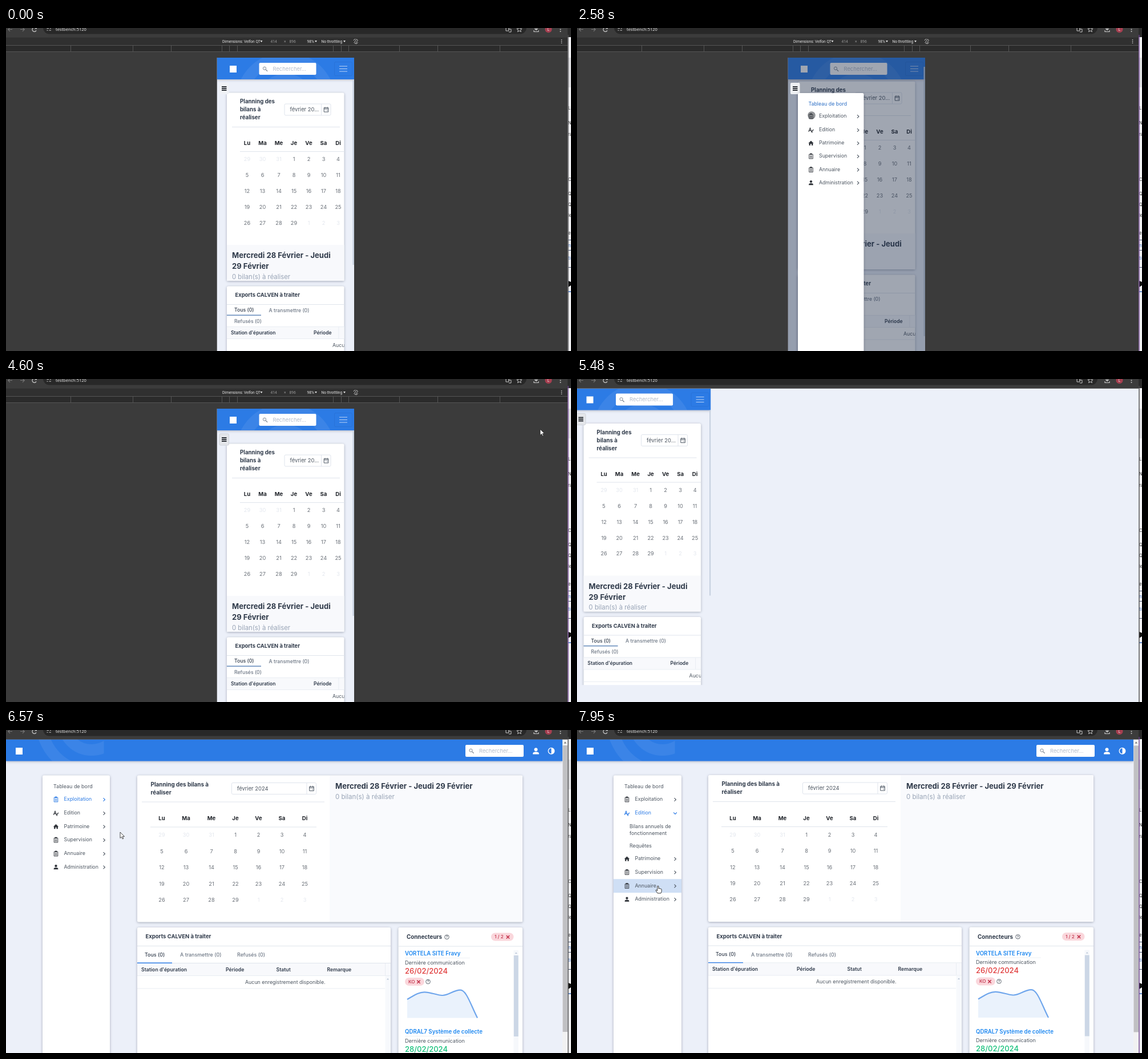
Write an HTML page that moves like this. It is 990x566 px and loops after 8000 ms.

```html
<!DOCTYPE html>
<html lang="fr">
<head>
<meta charset="utf-8">
<title>Tableau de bord</title>
<style>
  html, body { margin: 0; width: 100%; height: 100%; overflow: hidden; background: #3b3b3b; }
  svg { display: block; width: 100vw; height: 100vh; font-family: Inter, "Open Sans", sans-serif; }
  .card { fill: #fff; filter: drop-shadow(0 1.2px 2px rgba(55, 62, 85, .4)); }
  .bar { filter: drop-shadow(0 1.5px 2px rgba(65, 69, 88, .35)); }
  .ui { font-family: Roboto, sans-serif; }
</style>
</head>
<body>
<svg id="stage" viewBox="0 0 990 566" xmlns="http://www.w3.org/2000/svg"></svg>
<script>
const LOOP = 8000;
const BLUE = '#2c7be5', INK = '#2f3a4a', BODY = '#4d5661', MUTED = '#98a4b6', LINE = '#dfe4ec', PAGE = '#ecf0f9';

// Markup helpers; text is placed by its vertical centre.
const text = (x, y, s, size, fill = BODY, weight = 400, anchor = 'start', extra = '') =>
  `<text x="${x}" y="${(y + size * .36).toFixed(2)}" font-size="${size}" fill="${fill}" font-weight="${weight}" text-anchor="${anchor}" ${extra}>${s}</text>`;
const rect = (x, y, w, h, fill, extra = '') =>
  `<rect x="${x}" y="${y}" width="${w}" height="${h}" fill="${fill}" ${extra}/>`;
const path = (d, stroke, width = 1, extra = 'fill="none"') =>
  `<path d="${d}" stroke="${stroke}" stroke-width="${width}" ${extra}/>`;
const card = (x, y, w, h) => `<rect class="card" x="${x}" y="${y}" width="${w}" height="${h}" rx="2.5"/>`;
const clip = (id, x, y, w, h) => `<clipPath id="${id}">${rect(x, y, w, h, '#000')}</clipPath>`;
const group = (id, body, extra = '') => `<g id="${id}" ${extra}>${body}</g>`;
const at = (x, y, body) => `<g transform="translate(${x} ${y})">${body}</g>`;

const icons = {
  list: path('M-3.3-3.300h6.600v7.600h-6.600z', 'currentColor', .9) + `<path d="M-2-5h4v2.400h-4z" fill="currentColor"/>` +
    path('M-2-.9h4M-2 .8h4M-2 2.500h4', 'currentColor', .8),
  edit: path('M-4.2 3L-1.5-3.4L1 3M-3.3 1H0', 'currentColor', 1.2) + path('M.8 3.6L4.3-.8M1 4.2h1.6', 'currentColor', 1.4),
  home: `<path d="M0-4.2L4.6 .2H3.400V4H1V1.4H-1V4H-3.400V.2H-4.600z" fill="currentColor"/>`,
  user: `<circle cy="-2" r="2.1" fill="currentColor"/><path d="M-3.8 4V3Q-3.8 .9 0 .9T3.8 3V4z" fill="currentColor"/>`
};
const menu = [['list', 'Exploitation'], ['edit', 'Edition'], ['home', 'Patrimoine'],
  ['list', 'Supervision'], ['list', 'Annuaire'], ['user', 'Administration']];

const menuRow = (i, x, y, textX, chevX, size) =>
  `<g color="#30343a">${at(x, y + .7, icons[menu[i][0]])}</g>` + text(textX, y, menu[i][1], size, 'currentColor') +
  at(chevX, y + 1, `<path class="chev" d="M-1.5-2.8L1.4 0L-1.5 2.8" fill="none" stroke="currentColor" stroke-width="1.1"/>`);

const search = (x, y, w, h) => rect(x, y, w, h, '#fff', 'rx="2"') +
  `<circle cx="${x + 9.5}" cy="${y + h / 2 - .8}" r="2.6" fill="none" stroke="#7d8794" stroke-width="1"/>` +
  path(`M${x + 11.4} ${y + h / 2 + 1.1}l3.2 3.2`, '#7d8794', 1.3) + text(x + 24, y + h / 2, 'Rechercher...', 9.4, '#b3bccb');

const waves = (x, y, r, id) => `<g clip-path="url(#${id})" fill="none" stroke="#fff" stroke-opacity=".07" stroke-width="20">` +
  `<circle cx="${x}" cy="${y}" r="${r}"/><circle cx="${x}" cy="${y}" r="${r - 38}"/></g>`;

const dateBox = (x, y, w, label) => rect(x, y, w, 20, '#fff', `stroke="${LINE}" rx="2"`) +
  path(`M${x + w - 16.5} ${y}v20`, LINE) + text(x + 9.5, y + 10, label, 9.4) +
  at(x + w - 8, y + 10, path('M-3.8-3.3h7.6v7.4h-7.6zM-3.8-1.2h7.6M-2-4.6v2M2-4.6v2M1 1.8h1.4', '#4f5965', 1));

function calendar(xs, headY, firstY, step) {
  let out = ['Lu', 'Ma', 'Me', 'Je', 'Ve', 'Sa', 'Di'].map((d, i) => text(xs[i], headY, d, 9.6, '#20242a', 700, 'middle')).join('');
  for (let k = 0; k < 35; k++) {
    const day = k - 2, inside = day > 0 && day < 30;
    out += text(xs[k % 7], firstY + step * Math.floor(k / 7), inside ? day : day < 1 ? day + 31 : day - 29,
      9.2, inside ? '#6a7078' : '#e3e7ee', 400, 'middle');
  }
  return out;
}

const help = (x, y) => `<circle cx="${x}" cy="${y}" r="3.8" fill="none" stroke="#4d5661" stroke-width=".9"/>` +
  text(x, y, '?', 6.3, BODY, 600, 'middle');
const pill = (x, y, w, label, fill, ink, mark) => rect(x, y, w, 14, fill, 'rx="7"') +
  text(x + 6, y + 7, label, 8.2, ink, 500) + at(x + w - 10, y + 7.3, path(mark, ink, 1.5));
const CROSS = 'M-2.7-2.7L2.7 2.7M2.7-2.7L-2.7 2.7', TICK = 'M-3.5 0L-1 2.6L3.7-2.6';

// Browser window and the strip of the window behind it
function browser() {
  const g = '#c9c9c9';
  return rect(0, 0, 985, 16.5, '#3c3c3c') + rect(65, -12, 847, 22.5, '#282828', 'rx="11"') +
    path('M11 2.5H4M7-.8L3.7 2.5L7 5.8M25 2.5h7M29-.8l3.3 3.3L29 5.8', '#777', 1.1) +
    path('M53 1A3.7 3.7 0 1 0 53 4.4M53.4-2v3h-3', g, 1.2) +
    path('M71.5.5h3.5M76.8.5h2M71.5 4h2M75.5 4h3.5', g, 1.2) +
    text(87, 2.2, 'testbench:5120', 7.5, '#eee', 400, 'start', 'style="font-family:\'Open Sans\',sans-serif"') +
    path('M876-1h5v6h-5zM880 2h5v5h-4', g, 1) +
    path('M899.5-2l1.3 3 3.3.3-2.5 2.2.8 3.2-2.9-1.8-2.9 1.8.8-3.2-2.5-2.2 3.3-.3z', g, 1) +
    path('M929-3v6M926.3 1l2.7 2.7L931.7 1M925 4v2.5h8V4', g, 1.2) +
    `<circle cx="950.5" cy="2.3" r="6" fill="#a53f50"/>` + text(950.5, 2.2, 'L', 7, '#f5dfe3', 400, 'middle') +
    `<g fill="${g}"><circle cx="971.5" cy="-1" r="1"/><circle cx="971.5" cy="2.5" r="1"/><circle cx="971.5" cy="6" r="1"/></g>`;
}

function strip() {
  const bits = [[140, 'LE'], [166, 'N'], [186, 'ra'], [265, 'C'], [290, 'Q'], [309, 'Q'], [328, 'le'], [359, 'e']];
  return rect(984, 0, 6, 566, '#f0f0f2') + rect(984, 0, 6, 16, '#2b2b2b') + rect(984, 52, 6, 52, '#dedee1') +
    bits.map(([y, s]) => text(985, y, s, 7.5, '#333')).join('') +
    text(985, 381, 'nt', 7.5, '#3d6fc0') + text(985, 403, 'ti', 7.5, '#3d6fc0') +
    path('M985 371.5h5M985 389.5h5M985 419.5h5', '#4a5672') + path('M985 462h5', '#3d6fc0', 1.5) +
    `<path d="M985 443l5 2v6l-5 3z" fill="#111"/>` + group('edge', rect(984.3, 12, 1.4, 554, 'currentColor'));
}

function devtools() {
  const w = '#e4e4e4', label = (x, s, c = w) => text(x, 23.4, s, 6.6, c);
  const arrows = [447.5, 543, 593].map(x => `<path d="M${x - 2} 22h4l-2 3z" fill="${w}"/>`).join('');
  const ticks = [113, 222, 289, 378, 391, 405, 573, 587, 600, 689, 756, 865].map(x => `M${x + .5} 31v10`).join('');
  return rect(0, 16.5, 985, 550, '#3b3b3b') + rect(0, 16.5, 985, 14, '#303030') + rect(0, 30.5, 985, 11, '#2b2b2b') +
    `<g class="ui">` + label(379, 'Dimensions: Velfon QT') + label(463.5, '414', '#9a9a9a') + label(487, '×', '#9a9a9a') +
    label(496.5, '896', '#9a9a9a') + label(527.5, '98%') + label(552.5, 'No throttling') + '</g>' + arrows +
    path('M614.500 19.500l2 2-4.500 6-2-2zM609 22a4 4 0 0 1 3.500-2.700M616.500 25a4 4 0 0 1-3.500 2.700', '#cfcfcf', .9) +
    `<g fill="${w}"><circle cx="973.5" cy="20.8" r=".8"/><circle cx="973.5" cy="23.5" r=".8"/><circle cx="973.5" cy="26.2" r=".8"/></g>` +
    path('M0 30.5h985M0 41.5h985' + ticks, '#555', 1);
}

function phone() {
  const xs = [422.5, 449.5, 478, 504.5, 530.5, 556.5, 582];
  const planning = card(387, 113.5, 205.5, 329.5) +
    ['Planning des', 'bilans à', 'réaliser'].map((s, i) => text(410, 129 + 14 * i, s, 9.7, INK, 700)).join('') +
    dateBox(488, 133, 81, 'février 20...') + path('M396 173.5h189M410 216.5h182.5', LINE) +
    `<g clip-path="url(#cPhoneCard)">${calendar(xs, 202, 230, 27.9)}</g>` +
    rect(387, 380, 205.5, 63, '#f8f9fc') +
    text(396, 398.5, 'Mercredi 28 Février - Jeudi', 13.1, INK, 700) + text(396, 417.5, '29 Février', 13.1, INK, 700) +
    text(396, 435.5, '0 bilan(s) à réaliser', 11.3, MUTED);
  const exports = card(387, 452.5, 205.5, 140) + text(401.5, 468, 'Exports CALVEN à traiter', 9.4, INK, 700) +
    path('M387 484.5h205.5', LINE) + text(400, 494, 'Tous (0)', 8.7, INK, 500) + rect(387, 502.6, 60, 1.3, '#4b77b0') +
    text(460.5, 494.5, 'A transmettre (0)', 8.7, '#6c7684', 500) + text(400, 513.5, 'Refusés (0)', 8.7, '#6c7684', 500) +
    rect(387, 523, 205.5, 21, '#f8f9fc') + path('M387 523.5h205.5M387 544.5h205.5M583 524v20M387 566h205.5', '#e9edf3') +
    text(394, 533.5, 'Station d\'épuration', 8.5, INK, 600) + text(539, 533.5, 'Période', 8.5, INK, 600) +
    text(572, 555.5, 'Aucun', 8.8, BODY, 400, 'start', 'clip-path="url(#cPhoneCard)"');
  const header = `<rect class="bar" x="369.5" y="52" width="240.5" height="38" fill="${BLUE}"/>` + waves(490, 130, 78, 'cPhone') +
    rect(392, 66, 12, 12, '#fff') + search(443.5, 61, 100, 21) +
    rect(575.5, 59.5, 31, 24, 'none', 'stroke="rgba(0,20,60,.07)" rx="2"') + path('M584 67h14M584 71.5h14M584 76h14', '#bcd4f6', 1.1);
  const ys = [154, 178, 201, 224, 247.5, 270.5];
  const drawer = card(387, 114, 115.5, 470) + text(405.5, 133, 'Tableau de bord', 8.8, '#2a6dc4') +
    ys.map((y, i) => menuRow(i, 410, y, 424, 492.5, 8.8)).join('');
  return rect(369.5, 52, 240.5, 520, PAGE) +
    `<g clip-path="url(#cPhoneBody)">${group('phonePage', planning + exports)}</g>` +
    `<g id="phoneHead" clip-path="url(#cPhoneHead)">${header}</g>` +
    rect(607.5, 90, 2.2, 325, '#c6d0df', 'id="phoneThumb"') +
    rect(369.5, 52, 240.5, 520, 'rgb(30,45,70)', 'id="veil"') +
    rect(374, 96, 16.5, 20, '#f0f2f6', 'id="burger" rx="2"') +
    path('M378 103h8.5M378 106h8.5M378 109h8.5', '#30343a', 1.8) + group('drawer', drawer, `color="${BODY}"`);
}

function dashboard() {
  const xs = [273, 315.5, 360, 402, 442.5, 483.5, 523.5];
  const planning = card(230, 79.5, 675, 257) + rect(567, 80, 338, 256, '#f9fafd') +
    text(253.5, 95, 'Planning des bilans à', 9.9, INK, 700) + text(253.5, 109, 'réaliser', 9.9, INK, 700) +
    dateBox(395.5, 92.5, 148, 'février 2024') + path('M238 126h320M253 170h291', LINE) + calendar(xs, 155, 184, 28.4) +
    text(577, 98.5, 'Mercredi 28 Février - Jeudi 29 Février', 13.1, INK, 700) + text(577, 117, '0 bilan(s) à réaliser', 11.5, MUTED);
  const exports = card(230, 346, 444, 237.5) + text(244.5, 362, 'Exports CALVEN à traiter', 9.5, INK, 700) +
    path('M230 378.5h444M230 408.5h444', LINE) + text(243, 393.5, 'Tous (0)', 8.9, INK, 500) + rect(230, 407.5, 61, 1.6, BLUE) +
    text(305, 394, 'A transmettre (0)', 8.9, '#6c7684', 500) + text(405, 394, 'Refusés (0)', 8.9, '#6c7684', 500) +
    rect(230, 409, 444, 21.5, '#f8f9fc') + path('M230 430.5h444M664.5 409v21M230 453h434', '#e9edf3') +
    [[237, 'Station d\'épuration'], [385, 'Période'], [473.5, 'Statut'], [562.5, 'Remarque']].map(([x, s]) => text(x, 419.5, s, 8.7, INK, 600)).join('') +
    text(419, 441.5, 'Aucun enregistrement disponible.', 8.85) + rect(664.5, 431, 9, 145, '#f7f9fc') +
    rect(232, 577, 432, 6, '#f4f6fa') + rect(240, 577, 346.5, 6, '#cdd8e8') +
    `<path d="M667 437.5h4l-2-2.5zM667 569h4l-2 2.5zM236 578.5v4l-2.5-2zM658 578.5v4l2.5-2z" fill="#b9c5d6"/>`;
  const chart = 'M703 472C714 466 722 459.5 733 459.3S755 465 765 465S785 455.5 796 455.7S814 481 826 504.5';
  const links = text(699, 392, 'VORTELA SITE Fravy', 9.7, '#1a86f0', 600) + path('M699 399.5h114M699 536.5h114', '#eef1f5') +
    text(699, 407.5, 'Dernière communication', 9.05) + text(699, 422, '26/02/2024', 13, '#e03a3a', 500) +
    pill(699, 434, 34, 'KO', '#fad7dc', '#c2324a', CROSS) + help(739.5, 441) +
    `<path d="${chart}H703z" fill="#eaf2fc"/>` + path(chart, '#6fa6ec', 2.2) +
    text(699, 529, 'QDRAL7 Système de collecte', 9.7, '#1a86f0', 600) + text(699, 544.5, 'Dernière communication', 9.05) +
    text(699, 559, '28/02/2024', 13, '#12c07a', 500) + pill(699, 571, 33, 'OK', '#ccf4e1', '#0f9d66', TICK);
  const connectors = card(687.5, 346, 217.5, 237.5) + text(702, 362.5, 'Connecteurs', 9.8, INK, 700) + help(772.5, 362.8) +
    pill(850, 355.5, 39.5, '1 / 2', '#fad7dc', '#c2324a', CROSS) + path('M687.5 379h217.5', LINE) +
    `<g clip-path="url(#cLinks)">${links}</g>` + rect(889.5, 386, 8.5, 194, '#f6f8fb') + rect(889.8, 395, 8, 142, '#ccd7e6') +
    `<path d="M891.8 392h4l-2-2.5z" fill="#b9c5d6"/>`;
  const header = `<rect class="bar" x="0" y="16.5" width="975" height="38" fill="${BLUE}"/>` + waves(150, -15, 88, 'cWave') +
    rect(17, 31, 12, 12, '#fff') + search(805, 26, 102, 21) +
    `<g color="#fff"><g transform="translate(928.5 37) scale(1.4)">${icons.user}</g></g>` +
    `<circle cx="955.5" cy="36.7" r="5.3" fill="none" stroke="#fff" stroke-width="1.3"/><path d="M955.5 31.4a5.3 5.3 0 0 1 0 10.6z" fill="#fff"/>`;
  const rows = menu.map((m, i) => group('row' + i, menuRow(i, 87.5, 0, 101.5, 172, 8.9))).join('');
  const sub = text(92, 168.5, 'Bilans annuels de', 8.8) + text(92, 181, 'fonctionnement', 8.8) + text(92, 203, 'Requêtes', 8.8);
  const side = `<rect class="card" id="sidebar" x="64" y="79.5" width="118" height="500" rx="2.5"/>` +
    rect(64, 0, 119, 24, '#cfdff5', 'id="hover"') + text(83, 99, 'Tableau de bord', 8.95) + group('sub', sub) + rows;
  const bar = rect(975, 16.5, 9.5, 550, '#f1f1f2') + `<path d="M977.5 23.5h4.5l-2.25-3z" fill="#777"/>` +
    rect(975.5, 27, 8.5, 502, '#c0c0c3', 'id="thumb"');
  return rect(0, 16.5, 985, 550, PAGE) + group('page', planning + exports + connectors) + header + side + bar;
}

const pointers = group('arrow', path('M0 0V10.5L2.5 8.2L4.1 11.9L5.8 11.2L4.2 7.6H7.5z', '#222', .8, 'fill="#fff" stroke-linejoin="round"')) +
  group('hand', path('M-1.2.8Q0-.6 1 .8V5Q2 4 3 5Q4 4.3 4.8 5.5Q6 5.2 6.2 6.5V9.5Q6 11 5 13H-.8L-3.8 8.6Q-4.2 7-2.8 7.2L-1.2 8.8z', '#222', .9, 'fill="#fff" stroke-linejoin="round"')) +
  group('touch', `<circle r="6.3" fill="rgba(50,54,60,.5)" stroke="rgba(50,54,60,.35)" stroke-width="1.2"/>`);

stage.innerHTML = `<defs>${clip('cPhone', 369.5, 52, 240.5, 38)}${clip('cPhoneHead', 369.5, 52, 240.5, 45)}
  ${clip('cPhoneBody', 369.5, 52, 240.5, 520)}${clip('cPhoneCard', 387, 100, 205.5, 480)}
  ${clip('cPhoneAll', 369.5, 52, 240.5, 520)}${clip('cWave', 0, 16, 171.5, 38.5)}${clip('cLinks', 688, 380, 200, 200)}</defs>` +
  group('dash', dashboard()) + group('plain', rect(0, 16.5, 985, 550, PAGE)) + group('tools', devtools()) +
  group('phone', phone(), 'clip-path="url(#cPhoneAll)"') + browser() + strip() + pointers;

const el = id => document.getElementById(id);
const set = (id, attrs) => { for (const k in attrs) el(id).setAttribute(k, attrs[k]); };
const show = (id, on) => { el(id).style.display = on ? '' : 'none'; };
const move = (id, x, y) => set(id, { transform: `translate(${x.toFixed(2)} ${y.toFixed(2)})` });

// Eased value(s) from rows of [time, ...values]
function tween(t, keys) {
  const i = keys.findIndex(k => k[0] > t);
  if (i === 0) return keys[0].slice(1);
  if (i < 0) return keys[keys.length - 1].slice(1);
  const a = keys[i - 1], b = keys[i];
  let p = (t - a[0]) / (b[0] - a[0]);
  p = p * p * (3 - 2 * p);
  return a.slice(1).map((v, j) => v + (b[j + 1] - v) * p);
}

const mousePath = [[60, 898, 567], [890, 383, 111], [2050, 384, 111], [2320, 441, 213], [2560, 411, 153], [2620, 411, 153],
  [2880, 430, 268], [3300, 426, 190], [3710, 384, 124], [3980, 385, 111], [4400, 385, 112], [4600, 936, 88],
  [5780, 936, 88], [6570, 200, 179], [6620, 200, 179], [6980, 128, 145], [7450, 128, 145], [7930, 142, 273]];
const rowY = [121, 145, 168.5, 192, 216, 239.5];

function draw(t) {
  const [mx, my] = tween(t, mousePath);
  const emulated = t < 5410, small = t < 5560;
  const clicked = t >= 6980;

  show('tools', emulated);
  show('plain', small && !emulated);
  show('phone', small);
  show('dash', !small);
  set('edge', { color: (t >= 1220 && emulated) || clicked ? '#6a3f8c' : '#4a4a4e' });

  if (small) {
    const open = t < 4120 ? tween(t, [[1150, 0], [1480, 1]])[0] : 0;
    if (emulated) el('phone').removeAttribute('transform');
    else move('phone', -375.4, -35.5);
    move('phonePage', 0, -20 * open);
    set('phoneThumb', { y: 90 - 22 * open, height: 325 + 147 * open });
    set('veil', { opacity: .42 * open });
    set('drawer', { opacity: open });
    set('burger', t < 1150 ? { fill: '#f0f2f6', stroke: 'none' }
      : { fill: t < 4120 ? '#eef0f3' : '#e4e6ea', stroke: t < 4120 ? 'none' : '#cfd3da' });
  } else {
    const scroll = tween(t, [[6980, 0], [7200, 53.4], [7470, 53.4], [7950, .5]])[0];
    const open = tween(t, [[6980, 0], [7180, 1]])[0];
    const active = clicked ? 1 : 0;
    move('page', 0, -scroll);
    set('thumb', { y: 27 + scroll * .86 });
    set('sidebar', { width: clicked ? 119 : 118 });
    set('sub', { opacity: open });
    let over = -1;
    menu.forEach((m, i) => {
      const y = rowY[i] + (i > 1 ? 56.5 * open : 0);
      const row = el('row' + i), on = i === active;
      move('row' + i, 0, y);
      row.setAttribute('color', on ? BLUE : BODY);
      row.firstChild.setAttribute('color', on ? BLUE : '#30343a');
      row.querySelector('.chev').setAttribute('d', on && clicked ? 'M-2.8-1.5L0 1.4L2.8-1.5' : 'M-1.5-2.8L1.4 0L-1.5 2.8');
      if (mx < 183 && Math.abs(my - y) < 12 && !on) { over = i; set('hover', { y: y - 11.3 }); }
    });
    show('hover', over >= 0);
  }

  const hidden = !emulated && t < 5820;
  const touch = emulated && mx > 369 && mx < 610 && my > 52;
  const hand = !small && mx < 183;
  show('touch', touch);
  show('hand', hand);
  show('arrow', !hidden && !touch && !hand);
  move(touch ? 'touch' : hand ? 'hand' : 'arrow', mx, my);
}

const start = performance.now();
function tick() {
  draw((performance.now() - start) % LOOP);
  requestAnimationFrame(tick);
}
tick();
</script>
</body>
</html>
```
